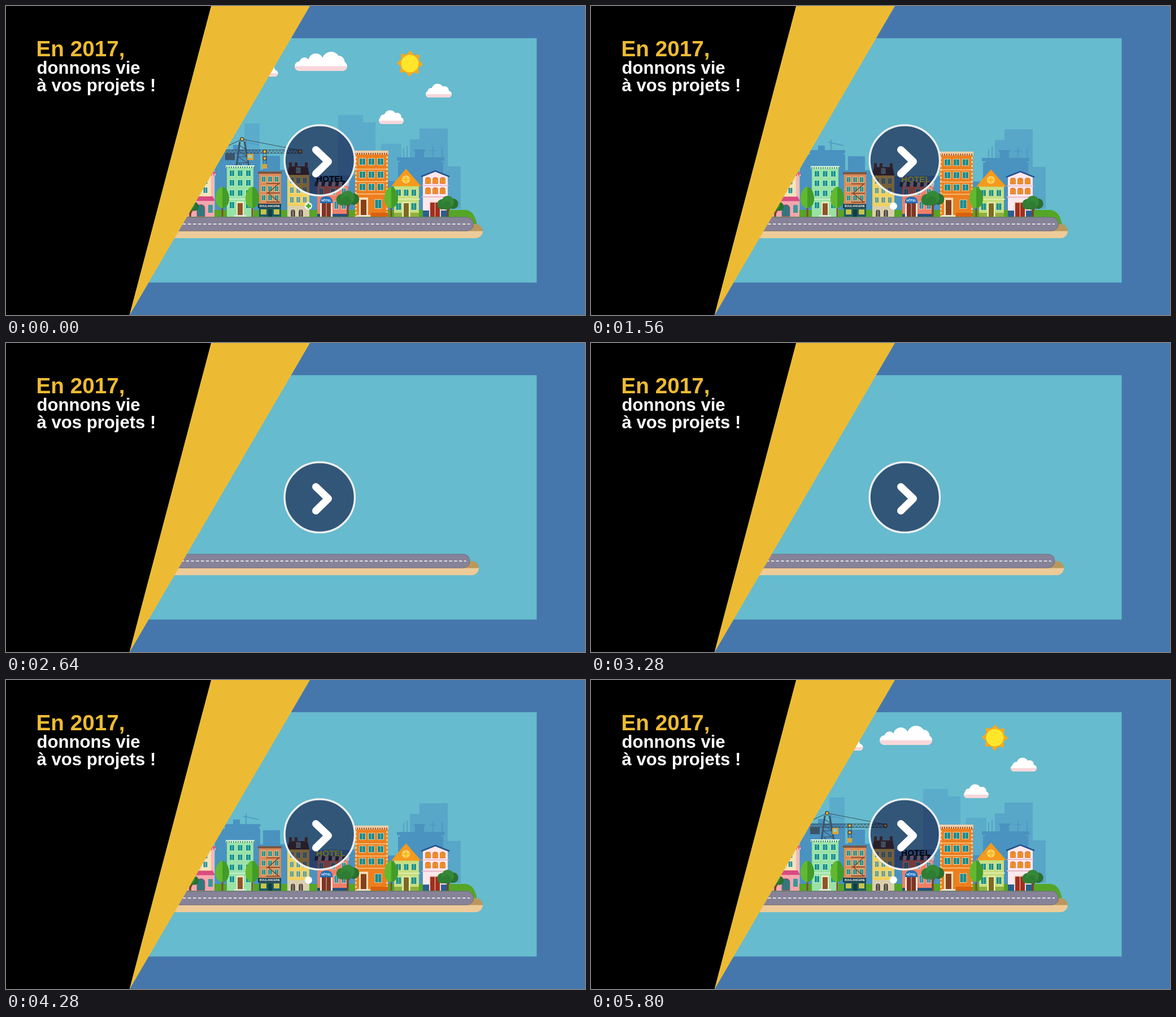
An HTML page with a canvas for the animation above (5.84 s loop, 1025 by 547 pixels).

```html
<!DOCTYPE html>
<html lang="fr">
<head>
<meta charset="utf-8">
<title>En 2017</title>
<style>
html, body { margin: 0; width: 100%; height: 100%; overflow: hidden; background: #4577ad; }
canvas { position: absolute; left: 0; top: 0; }
p { position: absolute; left: 54.5px; margin: 0; white-space: nowrap;
    font: bold 31.1px/40px "Liberation Sans", Arial, sans-serif; color: #fff; }
.year { left: 53.5px; top: 56px; font-size: 38.7px; color: #edbb33; }
</style>
</head>
<body>
<canvas id="stage" width="1025" height="547"></canvas>
<p class="year">En 2017,</p>
<p style="top:90px">donnons vie</p>
<p style="top:121px">à vos projets !</p>
<script>
const LOOP = 5840, STEP = 40, GROUND = 373;
const ctx = document.getElementById('stage').getContext('2d');

// Shape helpers
function rect(x, y, w, h, fill) {
  ctx.fillStyle = fill;
  ctx.fillRect(x, y, w, h);
}
function poly(fill, ...pts) {
  ctx.beginPath();
  for (let i = 0; i < pts.length; i += 2) ctx.lineTo(pts[i], pts[i + 1]);
  ctx.closePath();
  ctx.fillStyle = fill;
  ctx.fill();
}
function disc(x, y, r, fill) {
  ctx.beginPath();
  ctx.arc(x, y, r, 0, 2 * Math.PI);
  ctx.fillStyle = fill;
  ctx.fill();
}
function pill(x, y, w, h, r, fill) {
  ctx.beginPath();
  ctx.roundRect(x, y, w, h, r);
  ctx.fillStyle = fill;
  ctx.fill();
}
function line(color, width, ...pts) {
  ctx.beginPath();
  for (let i = 0; i < pts.length; i += 2) ctx.lineTo(pts[i], pts[i + 1]);
  ctx.strokeStyle = color;
  ctx.lineWidth = width;
  ctx.stroke();
}
function label(text, x, y, size, fill) {
  ctx.font = `bold ${size}px "Liberation Sans", Arial, sans-serif`;
  ctx.textAlign = 'center';
  ctx.fillStyle = fill;
  ctx.fillText(text, x, y);
}
function scaled(x, y, sx, sy, draw) {
  if (sx <= 0 || sy <= 0) return;
  ctx.save();
  ctx.translate(x, y);
  ctx.scale(sx, sy);
  ctx.translate(-x, -y);
  draw();
  ctx.restore();
}
const grow = (k, draw) => scaled(555, GROUND, 1, k, draw);

// Damped spring from 0 to 1
function spring(time, decay = .0081, speed = .0121) {
  return time <= 0 ? 0 : 1 - Math.exp(-decay * time) * Math.cos(speed * time);
}

function windows(xs, ys, w, h, glass, frame, arched) {
  for (const y of ys) for (const x of xs) {
    const r = arched ? [w / 2, w / 2, 0, 0] : 0;
    pill(x - w / 2 - .8, y - .8, w + 1.6, h + 1.6, r, frame);
    pill(x - w / 2, y, w, h, r, glass);
    rect(x - .3, y, .6, h, frame);
  }
}
function cornice(x, y, w, h, main, trim) {
  rect(x, y, w, h, main);
  for (let i = x + 1; i < x + w - 1; i += 4) rect(i, y + h - 3, 2, 3, trim);
}

// Sky
function sun(k, angle) {
  scaled(715, 102, k, k, () => {
    ctx.beginPath();
    for (let i = 0; i < 16; i++) {
      const r = i % 2 ? 17 : 23.5, a = angle + i * Math.PI / 8;
      ctx.lineTo(715 + r * Math.cos(a), 102 + r * Math.sin(a));
    }
    ctx.fillStyle = '#f6a821';
    ctx.fill();
    disc(715, 102, 15.5, '#ffe62a');
  });
}
function cloud(k, x, bottom, w, h, blobs) {
  scaled(x, bottom - h, k, k, () => {
    for (const [dx, dy, r] of blobs) {
      ctx.save();
      ctx.beginPath();
      ctx.rect(x - w / 2, 0, w, bottom - h / 2);
      ctx.clip();
      disc(x + dx, bottom - dy, r, '#fff');
      ctx.restore();
    }
    pill(x - w / 2, bottom - h, w, h, h / 2, '#fff');
    pill(x - w / 2, bottom - h / 2, w, h / 2, [0, 0, h / 2, h / 2], '#f8d7da');
  });
}
const SMALL = [[-2, 14, 10.5], [-13, 10, 7], [10, 12, 8]];
const BIG = [[-29, 15, 9], [-9, 18, 13], [18, 18, 16], [31, 16, 11]];

function farTowers() {
  const c = '#5babcb';
  rect(422, 208, 27, 165, c);
  rect(588, 193, 44, 180, c);
  rect(632, 206, 22, 167, c);
  rect(664, 244, 36, 129, c);
}
function nearSkyline() {
  const c = '#4a92c0', pale = '#58a6c8';
  rect(715, 236, 18, 137, pale);
  rect(732, 217, 50, 156, pale);
  rect(774, 284, 31, 75, pale);
  rect(370, 262, 80, 111, c);
  rect(382, 254, 68, 5, c);
  rect(388, 259, 60, 4, c);
  rect(402, 246, 12, 9, c);
  line(c, 1.5, 425, 235, 425, 256);
  line(c, 1.2, 420, 240, 448, 246);
  rect(450, 290, 50, 83, c);
  rect(455, 265, 30, 30, c);
  rect(500, 300, 120, 73, c);
  rect(676, 310, 24, 63, c);
  rect(694, 276, 80, 97, c);
  rect(692, 268, 84, 6, c);
  rect(698, 274, 72, 3, c);
  rect(724, 256, 16, 12, c);
  rect(722, 254, 20, 3, c);
  for (const x of [704, 710, 756, 772]) line(c, 1.3, x, 248 + x % 5, x, 268);
  line(c, 1, 750, 256, 763, 256);
}
function crane() {
  const steel = '#3c5467';
  line(steel, 3, 414, 240, 408, 284);
  line(steel, 3, 422, 240, 430, 284);
  for (let y = 246; y < 282; y += 11) line(steel, 1.2, 412, y, 427, y + 10, 410, y + 10);
  line(steel, 1, 375, 256, 418, 236, 522, 256);
  line(steel, 1.2, 372, 255, 524, 255);
  line(steel, 1.2, 372, 261, 524, 261);
  for (let x = 374; x < 522; x += 6) line(steel, .9, x, 261, x + 3, 255, x + 6, 261);
  rect(388, 261, 17, 12, steel);
  rect(427, 262, 11, 11, '#dca62f');
  rect(429, 264, 6, 5, '#8fd0d8');
  line(steel, 1, 455, 260, 455, 281);
  line(steel, 1, 461, 260, 461, 281);
  rect(454, 280, 8, 8, '#dca62f');
  for (const [x, y] of [[418, 236], [458, 258], [458, 270], [521, 258]]) {
    disc(x, y, 3.8, '#39444d');
    disc(x, y, 2.4, '#edb42f');
  }
}

// Street
function grass() {
  ctx.beginPath();
  ctx.moveTo(300, 388);
  ctx.lineTo(300, 361);
  ctx.lineTo(814, 361);
  ctx.quadraticCurveTo(830, 363, 834, 388);
  ctx.fillStyle = '#55a527';
  ctx.fill();
}
function pinkShop() {
  rect(320, 299, 49, 74, '#f7e3b5');
  cornice(320, 293, 51, 7, '#d9607f', '#f7c9cf');
  windows([338, 353], [305, 321], 7, 10, '#2d8f92', '#fff');
  rect(363, 300, 6, 45, '#f3b9b8');
  rect(320, 343, 49, 30, '#f4a7ae');
  poly('#d94c82', 332, 345, 337, 337, 366, 337, 370, 345);
  windows([345], [352], 13, 20, '#287c80', '#a13e62', true);
  rect(358, 352, 8, 14, '#38989a');
}
function greenHouse() {
  rect(391, 284, 47, 89, '#98e2a5');
  cornice(389, 282, 51, 5, '#d9f5dc', '#4b9470');
  windows([400, 414.5, 429], [291, 308, 326], 8, 10, '#14918f', '#c9f4d0');
  windows([400, 429], [347], 8, 11, '#14918f', '#c9f4d0');
  rect(391, 341, 47, 1.5, '#d9f5dc');
  rect(408, 346, 13, 27, '#f5e9c6');
  rect(410, 349, 9, 24, '#8d5427');
  rect(404, 370, 21, 3, '#dfe4dd');
}
function bakery() {
  rect(448, 296, 39, 77, '#dd8c58');
  rect(446, 293, 42, 4, '#7b5744');
  windows([456, 467.5, 479], [302, 319, 335], 6.5, 9, '#1c8f8f', '#f0d2a6');
  for (const y of [314, 331, 347]) line('#70402e', 1.4, 461, y, 485, y);
  line('#70402e', 1.4, 483, 314, 464, 331);
  line('#70402e', 1.4, 464, 331, 483, 347);
  rect(446, 350, 41, 8, '#173e4c');
  label('BOULANGERIE', 467, 356, 4.9, '#fff');
  rect(448, 358, 39, 15, '#1d5c62');
  for (const x of [451, 474]) rect(x, 360, 10, 9, '#c9c34a');
  rect(464, 360, 7, 13, '#113d45');
}
function pharmacy(crossLit) {
  rect(498, 298, 39, 75, '#f1d05c');
  poly('#4d4148', 498, 299, 501, 284, 534, 284, 537, 299);
  for (const x of [501, 511, 529]) rect(x, 277, 5, 9, '#6a4a44');
  windows([506, 517.5, 529], [304, 321, 338], 6.5, 10, '#5a9a96', '#fbe9ab');
  windows([517.5], [287], 6, 8, '#5aa0a0', '#e6d9c0');
  rect(498, 354, 39, 19, '#d9cfac');
  windows([508, 522], [360], 8, 13, '#5a5148', '#f3ead0', true);
  disc(535.5, 354, 6.5, '#fff');
  if (crossLit) {
    rect(531, 352.3, 9, 3.4, '#3fae2a');
    rect(533.8, 349.5, 3.4, 9, '#3fae2a');
  }
}
function hotel(lit) {
  rect(551, 312, 55, 61, '#f07f68');
  rect(550, 310, 57, 2, '#37434f');
  for (let i = 0; i < 10; i++) {
    const x = 546 + i * 6.1;
    poly(i % 2 ? '#b9b4b8' : '#2c3d52', x + 1, 311, x + 7, 311, x + 6.1, 319, x, 319);
  }
  windows([558, 579, 598], [323], 7, 11, '#2f8995', '#fbe2d6');
  windows([585, 598], [346], 7, 13, '#2f8995', '#fbe2d6');
  label('HOTEL', 575, 311, 15.3, lit ? '#f3ef28' : '#000');
  rect(556, 347, 22, 26, '#f9e5d8');
  rect(559, 348, 16, 25, '#7e3424');
  rect(566.6, 349, .8, 24, '#f9e5d8');
  pill(556, 337, 22, 12, [9, 9, 0, 0], '#1e6fb8');
  label('HÔTEL', 567, 345.5, 5.2, '#fff');
  rect(551, 368, 5, 5, '#284f7d');
  rect(578, 368, 28, 5, '#284f7d');
}
function orangeBlock() {
  rect(618, 262, 58, 111, '#ec7f1f');
  for (let y = 266; y < 372; y += 7) {
    rect(618, y, 3, 4, '#f9c47e');
    rect(673, y, 3, 4, '#f9c47e');
  }
  cornice(616, 256, 61, 7, '#eccfa9', '#a4502b');
  windows([631, 647, 663], [270, 293, 315], 10, 11, '#128d91', '#fde3bd');
  for (const y of [288, 310, 332]) rect(618, y, 58, 1.5, '#f9c98c');
  windows([659], [343], 11, 15, '#128d91', '#fde3bd');
  rect(625, 339, 16, 34, '#fbe0b8');
  rect(628, 343, 10, 30, '#84401c');
  rect(621, 370, 24, 3, '#efe3d2');
  rect(646, 366, 30, 7, '#d8610f');
}
function gableHouse() {
  rect(687, 316, 44, 57, '#c6de7e');
  poly('#f59a1b', 708, 288, 735, 319, 682, 319);
  disc(708, 307, 7, '#fbd78a');
  disc(708, 307, 5.5, '#ffd23c');
  line('#f59a1b', 1, 702, 307, 714, 307);
  line('#f59a1b', 1, 708, 301, 708, 313);
  windows([695, 708.5, 722], [325], 8, 11, '#1c8e86', '#eaf3bb');
  rect(685, 341, 48, 1.5, '#eaf3bb');
  windows([695, 722], [349], 9, 12, '#1c8e86', '#eaf3bb');
  rect(702, 347, 13, 26, '#eaf3bb');
  rect(704, 349, 9, 24, '#7e6a24');
  rect(687, 366, 14, 7, '#8eb03f');
  rect(716, 366, 15, 7, '#8eb03f');
}
function whiteHouse() {
  poly('#fde8ec', 738, 373, 738, 301, 760, 293, 782, 301, 782, 373);
  line('#24518d', 2.5, 735, 302, 760, 292, 785, 302);
  windows([747, 760, 773], [304, 322], 8, 10, '#f3951f', '#cf5d34', true);
  rect(736, 317, 48, 1.5, '#e6b7c4');
  rect(736, 337, 48, 2, '#e6b7c4');
  rect(738, 362, 44, 11, '#285e92');
  rect(749, 346, 21, 27, '#f7d6cf');
  rect(751, 348, 17, 25, '#a12f1d');
  rect(759, 348, 1, 25, '#f7d6cf');
}
function poplar(x) {
  rect(x - 1.5, 350, 3, 23, '#80502b');
  const crown = (side, fill) => {
    ctx.beginPath();
    ctx.moveTo(x, 320);
    ctx.bezierCurveTo(x + side * 13, 321, x + side * 19, 355, x, 358);
    ctx.fillStyle = fill;
    ctx.fill();
  };
  crown(-1, '#62b92f');
  crown(1, '#429c29');
}
function roundTree(x, y, r) {
  line('#74452a', 3.5, x, GROUND, x, y + 6);
  line('#74452a', 2, x, y + 17, x + r * .7, y + 5);
  disc(x - r * .85, y + 4, r * .85, '#2f7d33');
  disc(x + r * .85, y + 3, r * .85, '#2a7030');
  disc(x, y, r, '#358837');
  disc(x - r * .2, y + 6, r * .7, '#2f7d33');
}
function island() {
  pill(266, 386, 578, 25, 12.5, '#ba985d');
  pill(266, 398.5, 578, 12.5, [0, 0, 12.5, 12.5], '#edcb99');
  pill(281, 373.5, 547, 25, 12.5, '#6f6c80');
  pill(281, 374.5, 546, 23, 11.5, '#868399');
  ctx.setLineDash([5.5, 3.5]);
  line('#fff', 1.5, 295, 386, 821, 386);
  ctx.setLineDash([]);
}

function playButton() {
  ctx.globalCompositeOperation = 'multiply';
  disc(555.3, 273.2, 62, '#7d7595');
  ctx.globalCompositeOperation = 'source-over';
  ctx.beginPath();
  ctx.arc(555.3, 273.2, 62.2, 0, 2 * Math.PI);
  ctx.strokeStyle = '#eceff1';
  ctx.lineWidth = 3.4;
  ctx.stroke();
  ctx.lineCap = ctx.lineJoin = 'round';
  line('#fff', 13, 548.5, 254.5, 570.5, 275.5, 548.5, 297);
  ctx.lineCap = 'butt';
  ctx.lineJoin = 'miter';
}

// The town is built up with `age`; the loop plays it backwards, then forwards.
function render(now) {
  const time = Math.floor(now % LOOP / STEP) * STEP;
  const age = Math.abs(time - LOOP / 2);
  const since = start => spring(age - start);
  const puff = start => spring(age - start, .008, .0175);
  const crossLit = age > 1500 && ((age - 2900) % 600 + 600) % 600 < 300;
  const stretch = 1 + .125 * Math.exp(-age / 220) * Math.cos(Math.PI * age / 380);

  rect(0, 0, 1025, 547, '#4577ad');
  rect(200, 57, 739.5, 432.5, '#66bbce');

  cloud(puff(1600), 557.5, 115, 93, 17, BIG);
  cloud(puff(1600), 458, 125, 47, 12, SMALL);
  cloud(puff(1650), 766, 162, 46, 12, SMALL);
  cloud(puff(1680), 682, 209, 44, 12, SMALL);
  sun(since(1850), (age - LOOP / 2) * .0004 + .05);

  grow(since(1330), farTowers);
  grow(since(950), nearSkyline);
  grow(since(2200), crane);
  grow(since(560), grass);
  grow(since(834), () => {
    pinkShop();
    greenHouse();
    bakery();
    pharmacy(crossLit);
    hotel(age < 2650);
    orangeBlock();
    gableHouse();
    whiteHouse();
  });
  grow(since(638), () => {
    [383, 436, 682].forEach(poplar);
    roundTree(605, 339, 12);
    roundTree(782, 347, 11);
    roundTree(326, 352, 9);
  });
  scaled(555, GROUND, stretch, 1, island);
  playButton();

  poly('#edbb33', 363, 0, 538, 0, 219, 547, 218.5, 547);
  poly('#000', 0, 0, 363, 0, 218.5, 547, 0, 547);
}

function frame() {
  render(performance.now());
  requestAnimationFrame(frame);
}
frame();
</script>
</body>
</html>
```
